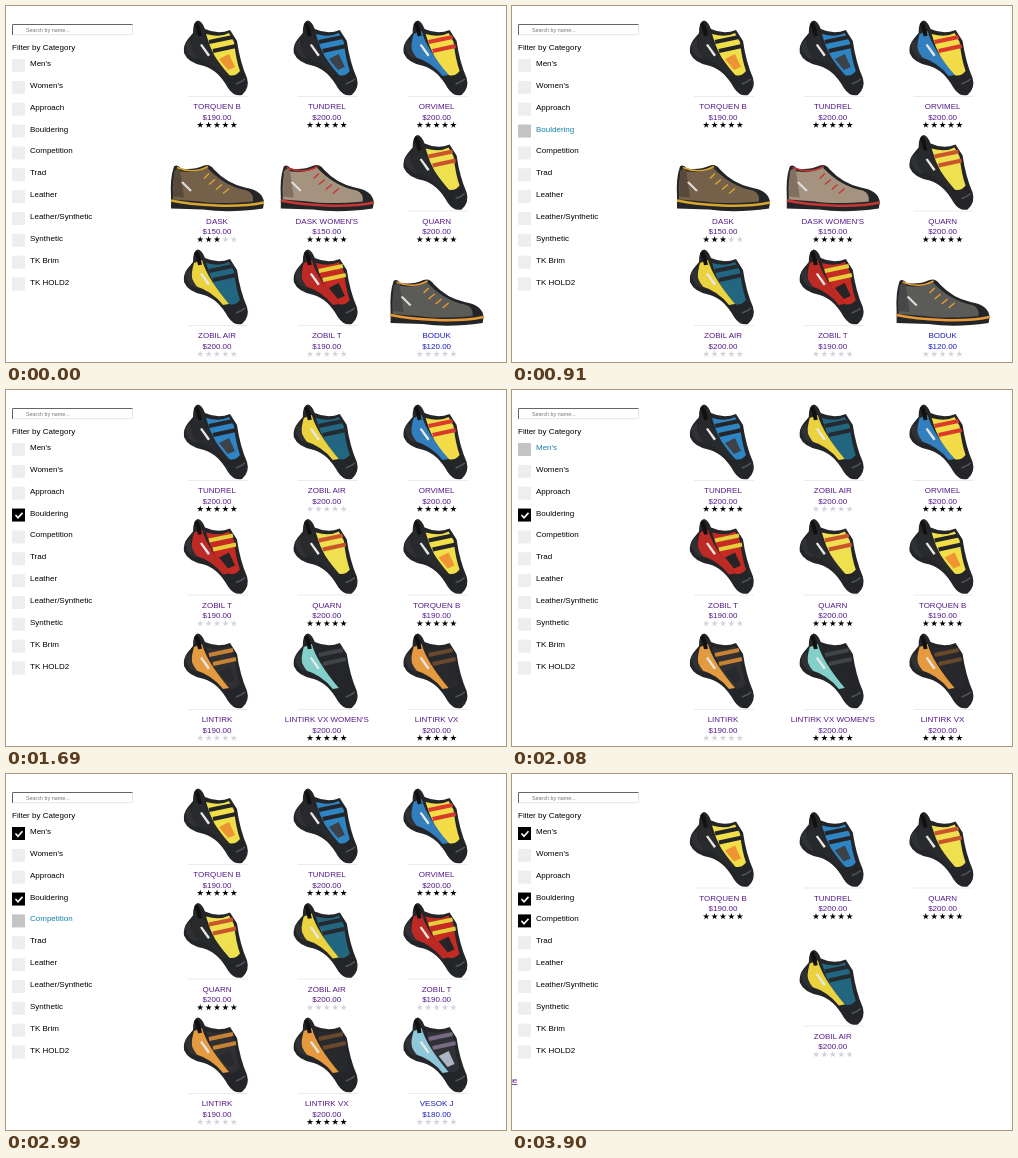
Animation, 500 px wide and 356 px high, one loop 4550 ms. Source, as an HTML page:

```html
<!DOCTYPE html>
<html lang="en">
<head>
<meta charset="utf-8">
<title>Shoe filter</title>
<style>
  html, body { margin: 0; width: 100%; height: 100%; overflow: hidden; background: #fff; }
  svg { display: block; width: 500px; height: 356px; font: 8px "Liberation Sans", Arial, sans-serif; }
  .product text { text-anchor: middle; }
</style>
</head>
<body>
<svg id="stage" viewBox="0 0 500 356"></svg>
<script>
const LOOP = 4550;
const PURPLE = "#551a8b", BLUE = "#1c1cc4", HOVER = "#1580ab";

const labels = ["Men's", "Women's", "Approach", "Bouldering", "Competition", "Trad",
  "Leather", "Leather/Synthetic", "Synthetic", "TK Brim", "TK HOLD2"];

const path = (d, fill, extra = "") => `<path d="${d}" fill="${fill}" ${extra}/>`;
const line = (d, color, width) => path(d, "none", `stroke="${color}" stroke-width="${width}"`);
const text = (x, y, str, fill = "#000", extra = "") =>
  `<text x="${x}" y="${y}" fill="${fill}" ${extra}>${str}</text>`;

// Climbing shoe, 68 x 77: heel panel, upper, strap and patch colours
function climber(heel, upper, strap, patch) {
  return line("M6 76.5H66", "#ddd", .6) +
    path("M11 13Q11 1 16 .5Q20 1 23 9Q36 15 48 10L55 21Q58 42 65 58Q68 68 60 75Q52 77 46 68Q36 50 22 46Q6 43 2 33Q1 25 6 19Z", "#242528") +
    path("M24 14Q38 18 47 13L52 22Q54 40 58 51Q53 57 47 55Q31 40 24 14Z", upper) +
    path("M12 14L20 11Q25 29 47 55L41 56Q30 42 13 37Q7 31 12 14Z", heel) +
    path("M37 39L47 34L53 47L46 50Z", patch) +
    line("M27 22L51 17M31 31L54 26", strap, 4) +
    line("M14 3Q17 9 18 16", "#111", 4) +
    path("M3 24L9 19Q8 30 16 39Q5 38 3 24Z", "#303135") +
    path("M18 25l2-1 8 11-2 1.500z", "#e8e8e8") +
    line("M54 64Q60 62 63 59", "#55575c", 1.5);
}

// Low walking shoe, 96 x 52
function walker(upper, trim, collar) {
  return path("M2 37Q1 18 5 7Q8 4 12 9Q24 11 35 6Q41 4 45 10Q58 24 76 28Q94 31 95 43L94 49Q60 54 34 50L2 49Z", "#242528") +
    path("M4 36Q3 20 7 11Q24 15 38 8Q56 27 78 31Q85 34 84 42Q50 45 30 42L4 40Z", upper) +
    path("M5 12Q8 7 11 10L15 38L4 37Z", collar) +
    line("M8 8Q24 15 39 7", trim, 1.5) +
    line("M40 14l-5 5M46 20l-6 5M53 25l-6 5M60 29l-6 5", trim, 1.5) +
    line("M2 41Q20 45 48 46T95 43", trim, 2.5) +
    path("M12 23l2-1 9 9-2 1z", "#ddd");
}

const shoe = (name, price, stars, art, wide = false, color = PURPLE) =>
  ({ name, price, stars, art, wide, color });

const shoes = {
  torquen: shoe("TORQUEN B", 190, 5, climber("#292a2c", "#f0df48", "#242528", "#ee9434")),
  tundrel: shoe("TUNDREL", 200, 5, climber("#28292c", "#2f85c3", "#242528", "#3c4248")),
  orvimel: shoe("ORVIMEL", 200, 5, climber("#337fbd", "#f2dd49", "#d93a2b", "#f2dd49")),
  dask: shoe("DASK", 150, 3, walker("#75614a", "#d9a62e", "#584a3b"), true),
  daskW: shoe("DASK WOMEN'S", 150, 5, walker("#a3937f", "#c93633", "#81705f"), true),
  quarn: shoe("QUARN", 200, 5, climber("#292a2c", "#efe050", "#c9552c", "#efe050")),
  zobilAir: shoe("ZOBIL AIR", 200, 0, climber("#ead33e", "#236680", "#242a30", "#236680")),
  zobilT: shoe("ZOBIL T", 190, 0, climber("#bd2924", "#c52a23", "#e5cf3c", "#252528")),
  boduk: shoe("BODUK", 120, 0, walker("#5b5b58", "#e99a36", "#464747"), true, BLUE),
  lintirk: shoe("LINTIRK", 190, 0, climber("#e39a40", "#303033", "#c78335", "#28292c")),
  lintirkW: shoe("LINTIRK VX WOMEN'S", 200, 5, climber("#83d0ca", "#252629", "#404448", "#252629")),
  lintirkVX: shoe("LINTIRK VX", 200, 5, climber("#e59a3f", "#28292c", "#69482c", "#28292c")),
  vesok: shoe("VESOK J", 180, 0, climber("#8fc7da", "#303136", "#776a82", "#adb4c3"), false, BLUE)
};

const grids = [
  "torquen tundrel orvimel dask daskW quarn zobilAir zobilT boduk",
  "tundrel zobilAir orvimel zobilT quarn torquen lintirk lintirkW lintirkVX",
  "torquen tundrel orvimel quarn zobilAir zobilT lintirk lintirkVX vesok",
  "torquen tundrel quarn - zobilAir"
].map(list => list.split(" "));

// [start ms, hovered label, checked labels, grid]
const states = [
  [0, -1, [], 0],
  [520, 0, [], 0],
  [650, 1, [], 0],
  [780, 2, [], 0],
  [910, 3, [], 0],
  [1170, 3, [3], 1],
  [1430, 2, [3], 1],
  [1560, 1, [3], 1],
  [1690, -1, [3], 1],
  [2080, 0, [3], 1],
  [2470, 0, [0, 3], 2],
  [2730, -1, [0, 3], 2],
  [2990, 4, [0, 3], 2],
  [3510, 4, [0, 3, 4], 3],
  [3900, -1, [0, 3, 4], 3]
];

function star(cx, cy, fill) {
  const points = Array.from({ length: 10 }, (_, i) => {
    const r = i % 2 ? 1.3 : 3.4, a = i * Math.PI / 5;
    return (cx + r * Math.sin(a)).toFixed(2) + "," + (cy - r * Math.cos(a)).toFixed(2);
  });
  return `<polygon points="${points.join(" ")}" fill="${fill}"/>`;
}

function product({ name, price, stars, art, wide, color }, cx, top) {
  const rating = [0, 1, 2, 3, 4].map(i =>
    star((i - 2) * 8.4, 105, i < stars ? "#000" : "#d2d2dc")).join("");
  return `<g class="product" transform="translate(${cx} ${top})">
    <g transform="translate(${wide ? "-48 25" : "-35 0"})">${art}</g>
    ${text(0, 89, name, color)}${text(0, 99.5, `$${price}.00`, color)}${rating}</g>`;
}

function option(label, i, hovered, checked) {
  const y = 53 + i * 21.85;
  const fill = checked ? "#000" : hovered ? "#c4c4c4" : "#eee";
  return `<rect x="6" y="${y}" width="13" height="13" fill="${fill}"/>` +
    (checked ? line(`M9.500 ${y + 6.5}l2.500 2.800 4.500-5`, "#fff", 1.6) : "") +
    text(24, y + 7, label, hovered ? HOVER : "#000");
}

function draw([, hover, checked, grid]) {
  const last = grid === 3;
  const top = last ? 37.5 : 14, step = last ? 138 : 114.5;
  const products = grids[grid].map((key, i) => key === "-" ? "" :
    product(shoes[key], 211 + i % 3 * 109.8, top + Math.floor(i / 3) * step));
  stage.innerHTML =
    line("M6.500 29V18.500H126.500", "#666", 1) +
    line("M7 28.700H126.500V19", "#ddd", .7) +
    text(20, 25.7, "Search by name...", "#757575", 'font-size="5.4"') +
    text(6, 44, "Filter by Category") +
    labels.map((label, i) => option(label, i, i === hover, checked.includes(i))).join("") +
    products.join("") +
    (last ? text(5.3, 309, "ue", PURPLE, 'text-anchor="end" text-decoration="underline"') : "");
}

const stage = document.getElementById("stage");
const start = performance.now();
let shown;
function tick() {
  const t = (performance.now() - start) % LOOP;
  const state = states.findLast(s => s[0] <= t) || states[0];
  if (state !== shown) draw(shown = state);
  requestAnimationFrame(tick);
}
tick();
</script>
</body>
</html>
```
